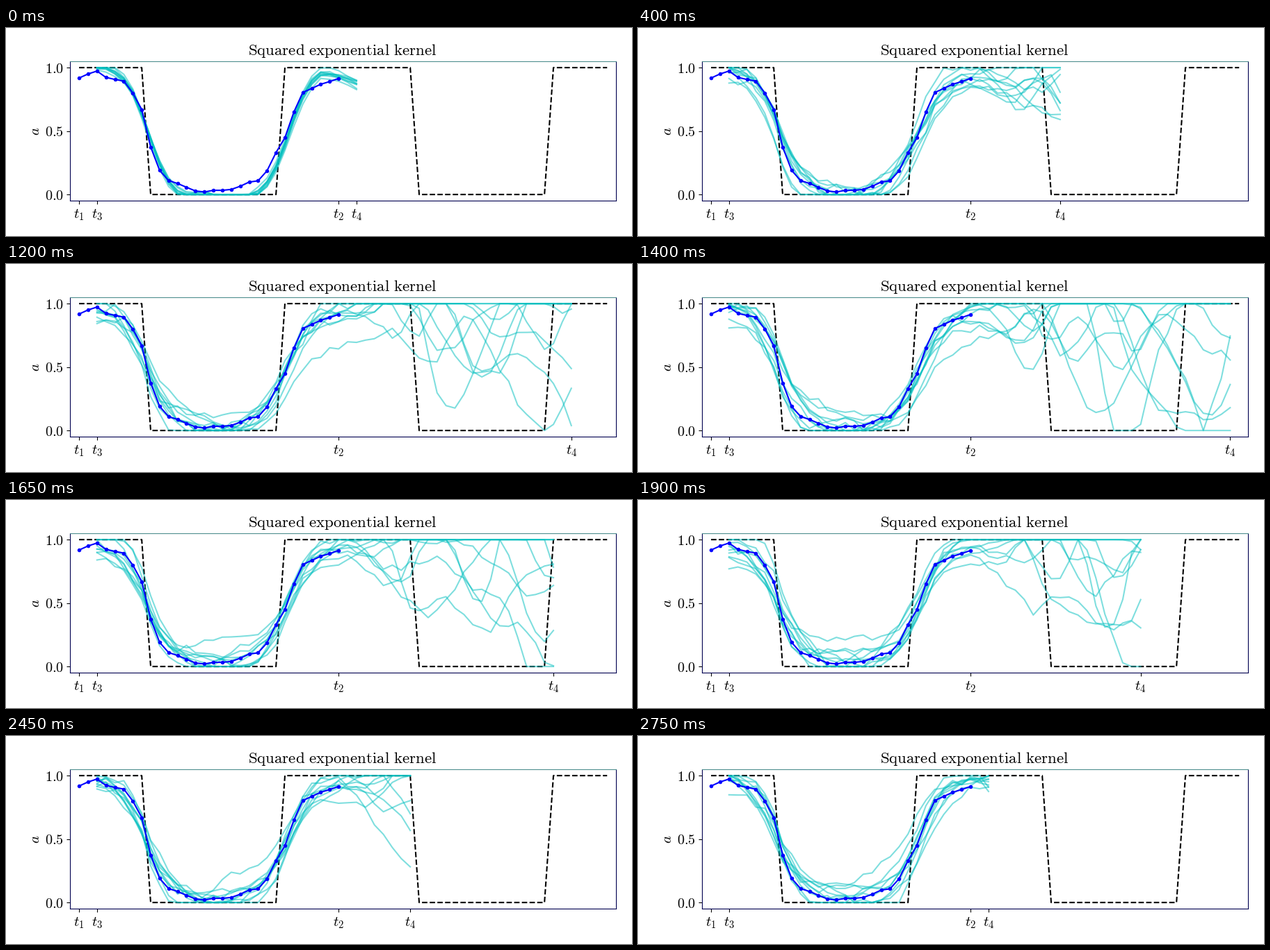
Write a matplotlib script that moves like this. It is 900 px wide and 300 px high and loops after 2.8 s.

```python
import matplotlib.pyplot as plt
import numpy as np
from matplotlib.animation import FuncAnimation

plt.rcParams["mathtext.fontset"] = "cm"

W, H, DPI = 900, 300, 100
FRAMES, INTERVAL = 56, 50
N, CURVES = 60, 10
T1, T2, T3 = 0, 29, 2
NAVY, TEAL = "#000050", "#4f8f8f"

steps = np.arange(N)
truth = ((steps + 7) // 15 % 2 == 0).astype(float)
observed = [
    .918, .95, .973, .923, .907, .894, .80, .67, .375, .19,
    .11, .087, .057, .028, .02, .033, .033, .04, .065, .098,
    .108, .187, .33, .448, .65, .804, .836, .869, .89, .915]


def sigmoid(x):
    return 1 / (1 + np.exp(-x))


def valley(fall, rise, width):
    """High, then low between the steps fall and rise, then high again."""
    return sigmoid((fall - steps) / width) + sigmoid((steps - rise) / width)


past_data = np.maximum(steps - T2, 0)
initial = (1.07 * valley(7.8, 23.4, 1.3) - .05
           + .06 * np.exp(-((steps - 14) / 1.8)**2)
           - .035 * np.maximum(steps - 27, 0))
settled = .02 + .93 * valley(7.5, 23.3, 1.45)
settled += .05 * (steps < 8)

# Uncertainty is small near the data and grows over the forecast.
deviation = .075 + .43 * (1 - np.exp(-(past_data / 8)**2))


def sample_chains():
    """Slowly changing squared exponential samples for every frame."""
    rng = np.random.default_rng(7)
    gap = steps[:, None] - steps
    kernel = np.exp(-gap**2 / (2 * 3.5**2)) + 1e-6 * np.eye(N)
    factor = np.linalg.cholesky(kernel)

    def draw():
        smooth = rng.standard_normal((CURVES, N)) @ factor.T
        return smooth * deviation + .018 * rng.standard_normal((CURVES, N))

    chain = [draw()]
    for _ in range(FRAMES - 1):
        chain.append(np.cos(.55) * chain[-1] + np.sin(.55) * draw())
    return chain


chains = sample_chains()


def horizon(k):
    return 31 + min(k, FRAMES - 1 - k)


def curves_at(k):
    fresh = np.exp(-k / 3)
    mean = fresh * initial + (1 - fresh) * settled
    return np.clip(mean + (1 - .7 * fresh) * chains[k], 0, 1)


fig = plt.figure(figsize=(W / DPI, H / DPI), dpi=DPI, facecolor="white")
left, bottom, width, height = 92.2, 50.7, 784.9, 201.3
ax = fig.add_axes([left / W, bottom / H, width / W, height / H])
ax.set_xlim(-1, N)
ax.set_ylim(-.05, 1.05)
ax.set_yticks([0, .5, 1], [r"$0.0$", r"$0.5$", r"$1.0$"])
ax.tick_params(labelsize=14.5)
ax.tick_params(axis="x", labelsize=15)
for side, spine in ax.spines.items():
    spine.set_color(TEAL if side == "top" else NAVY)

fig.text((left + width / 2 - 1) / W, 1 - 39 / H,
         r"$\mathrm{Squared\ exponential\ kernel}$",
         fontsize=16.5, ha="center", va="baseline")
fig.text(41.5 / W, 1 - 149 / H, "$a$", fontsize=15, rotation=90,
         ha="center", va="center")

ax.plot(steps, truth, "k--", lw=1.5, zorder=2)
samples = [ax.plot([], [], color="c", alpha=.5, lw=1.5, zorder=3)[0]
           for _ in range(CURVES)]
ax.plot(steps[:T2 + 1], observed, "b-o", lw=1.5, ms=3, zorder=4)


def update(k):
    end = horizon(k)
    for line, values in zip(samples, curves_at(k)):
        line.set_data(steps[T3:end + 1], values[T3:end + 1])
    ax.set_xticks([T1, T3, T2, end], ["$t_1$", "$t_3$", "$t_2$", "$t_4$"])
    return samples


anim = FuncAnimation(fig, update, frames=FRAMES, interval=INTERVAL,
                     init_func=lambda: update(0), repeat=True, repeat_delay=0)
plt.show()
```
